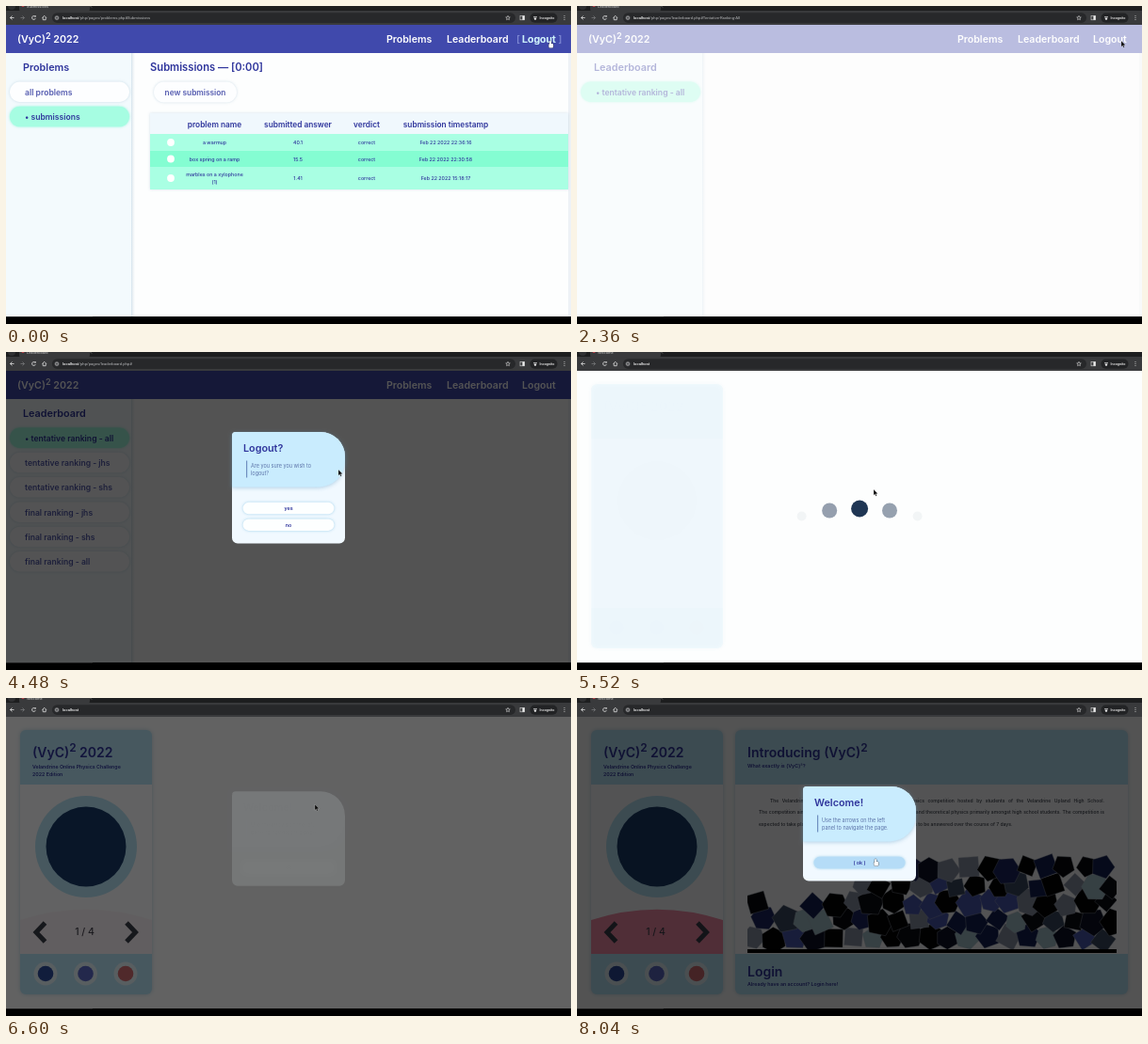
These frames come from a looping animation (600x338 px, 8080 ms). An HTML page with a canvas:

```html
<!DOCTYPE html>
<html lang="en">
<head>
<meta charset="utf-8">
<title>Contest site walkthrough</title>
<style>
html, body { margin: 0; width: 100%; height: 100%; overflow: hidden; background: #000; }
canvas { display: block; width: 600px; height: 338px; }
</style>
</head>
<body>
<canvas id="stage"></canvas>
<script>
const W = 600, H = 338, LOOP = 8080;
const canvas = document.getElementById('stage');
const ctx = canvas.getContext('2d');
const dpr = window.devicePixelRatio || 1;
canvas.width = W * dpr;
canvas.height = H * dpr;

const INK = '#2f359c', SOFT = '#555cb0', SKY = '#b8e4f6', PAGE = '#fdfefe';
const UI = 'Roboto, "Open Sans", sans-serif';
const BRAND = '(VyC)';

// ---- helpers ----
const clamp = v => Math.max(0, Math.min(1, v));
const ramp = (t, a, b) => clamp((t - a) / (b - a));
const ease = p => p * p * (3 - 2 * p);
const out = p => 1 - (1 - p) ** 3;

function seeded(seed) {
  return () => (seed = (seed * 16807) % 2147483647) / 2147483647;
}

function rect(x, y, w, h, color) {
  ctx.fillStyle = color;
  ctx.fillRect(x, y, w, h);
}

function round(x, y, w, h, r, color) {
  ctx.fillStyle = color;
  ctx.beginPath();
  ctx.roundRect(x, y, w, h, r);
  ctx.fill();
}

function dot(x, y, r, color) {
  ctx.fillStyle = color;
  ctx.beginPath();
  ctx.arc(x, y, r, 0, 7);
  ctx.fill();
}

function line(points, color, width) {
  ctx.strokeStyle = color;
  ctx.lineWidth = width;
  ctx.beginPath();
  points.forEach(([x, y]) => ctx.lineTo(x, y));
  ctx.stroke();
}

function text(s, x, y, size, color, weight = 600, align = 'left', family = 'Inter, sans-serif') {
  ctx.font = `${weight} ${size}px ${family}`;
  ctx.fillStyle = color;
  ctx.textAlign = align;
  ctx.textBaseline = 'alphabetic';
  ctx.fillText(s, x, y);
  return x + ctx.measureText(s).width;
}

function brand(lead, tail, x, y, size, color) {
  x = text(lead + BRAND, x, y, size, color);
  x = text('2', x, y - size * 0.36, size * 0.85, color);
  text(tail, x, y, size, color);
}

function justify(s, x, right, y, size, color) {
  const words = s.split(' ');
  ctx.font = `500 ${size}px Inter, sans-serif`;
  const widths = words.map(w => ctx.measureText(w).width);
  const gap = (right - x - widths.reduce((a, b) => a + b)) / (words.length - 1);
  words.forEach((w, i) => {
    text(w, x, y, size, color, 500);
    x += widths[i] + gap;
  });
}

function fade(alpha, draw) {
  if (alpha <= 0) return;
  ctx.save();
  ctx.globalAlpha *= alpha;
  draw();
  ctx.restore();
}

function glow(color, blur, dy = 0) {
  ctx.shadowColor = color;
  ctx.shadowBlur = blur * dpr;
  ctx.shadowOffsetY = dy * dpr;
}

function pill(x, y, w, h, color, shade = 'rgba(120,160,190,.35)') {
  ctx.save();
  glow(shade, 3);
  round(x, y, w, h, h / 2, color);
  ctx.restore();
}

// ---- browser frame ----
function chrome(title, host, path) {
  rect(0, 0, W, 5, '#1d1e1f');
  round(14, -6, 75, 12, 3, '#393a3c');
  dot(6, 0, 4, '#303133');
  dot(18, -0.5, 1.6, '#c2404a');
  text(title, 22, 1.6, 4, '#c8c8c8', 400, 'left', UI);
  line([[89.5, 0], [91, 1.5]], '#aaa', 0.5);
  rect(0, 5, W, 15, '#393a3c');
  round(49, 7.3, 492, 10.6, 5.3, '#27282a');

  const arrow = (x, d, c) => {
    line([[x - 2 * d, 12.5], [x + 2 * d, 12.5]], c, 0.8);
    line([[x, 10.5], [x + 2 * d, 12.5], [x, 14.5]], c, 0.8);
  };
  arrow(6.5, -1, '#e0e0e0');
  arrow(17.5, 1, '#77787a');
  ctx.strokeStyle = '#e0e0e0';
  ctx.lineWidth = 0.8;
  ctx.beginPath();
  ctx.arc(29.5, 12.5, 1.9, 0.3, 5.4);
  ctx.stroke();
  rect(30.4, 10.2, 1.4, 1.4, '#e0e0e0');
  line([[38.5, 12.5], [40.7, 10.3], [42.9, 12.5]], '#e0e0e0', 0.8);
  line([[39.2, 12], [39.2, 14.7], [42.2, 14.7], [42.2, 12]], '#e0e0e0', 0.8);
  dot(54, 12.6, 2.6, '#4c4d50');
  ctx.strokeStyle = '#ddd';
  ctx.lineWidth = 0.5;
  ctx.beginPath();
  ctx.arc(54, 12.6, 1.6, 0, 7);
  ctx.stroke();

  const x = text(host, 60, 14, 4.2, '#f2f2f2', 500, 'left', UI);
  text(path, x, 14, 4.2, '#b9babc', 400, 'left', UI);

  ctx.strokeStyle = '#d8d8d8';
  ctx.lineWidth = 0.6;
  ctx.beginPath();
  for (let i = 0; i < 10; i++) {
    const r = i % 2 ? 1.1 : 2.4, a = i * Math.PI / 5 - Math.PI / 2;
    ctx.lineTo(533 + r * Math.cos(a), 12.7 + r * Math.sin(a));
  }
  ctx.closePath();
  ctx.stroke();
  ctx.strokeRect(546, 10.4, 4.6, 4.4);
  rect(548.4, 10.4, 2.2, 4.4, '#eee');
  round(556.5, 7.5, 29, 10.2, 5, '#222325');
  dot(562, 13.6, 1.2, '#eee');
  rect(560, 11.4, 4, 0.8, '#eee');
  text('Incognito', 566.5, 14, 3.8, '#eee', 500, 'left', UI);
  [10.5, 12.5, 14.5].forEach(y => dot(593, y, 0.5, '#e0e0e0'));
}

function status(s) {
  round(0, 323.5, 69, 7.5, [0, 2, 0, 0], '#292a2c');
  text(s, 1.5, 328.6, 3.7, '#d6d6d6', 400, 'left', UI);
}

// ---- contest pages ----
function shell(heading, hover) {
  rect(0, 20, W, 311, PAGE);
  rect(0, 50, 134, 281, '#f3fafd');
  const edge = ctx.createLinearGradient(133, 0, 137, 0);
  edge.addColorStop(0, 'rgba(150,180,200,.3)');
  edge.addColorStop(1, 'rgba(150,180,200,0)');
  rect(133, 50, 4, 281, edge);
  rect(597, 50, 3, 281, '#eef2f6');

  rect(0, 20, W, 30, '#4049ac');
  brand('', ' 2022', 12, 39, 10.7, '#fff');
  text('Problems', 404, 39, 10.6, '#fff');
  text('Leaderboard', 468, 39, 10.6, '#fff');
  text('Logout', 548, 39, 10.6, '#fff');
  fade(hover, () => {
    text('Logout', 548, 39, 10.6, '#b5eafa');
    text('[', 544 - 2.5 * hover, 39, 10.6, '#8f9ade');
    text(']', 584.5 + 2.5 * hover, 39, 10.6, '#8f9ade');
  });
  text(heading, 18, 69, 10.8, INK);
}

function item(s, i, active) {
  const y = 80.5 + i * 26.3;
  if (active) pill(4, y, 127, 21.5, '#a6fde2', 'rgba(90,240,200,.6)');
  else pill(4, y, 127, 21.5, '#fdfeff');
  text((active ? '• ' : '') + s, 20, y + 14.1, 8.6, active ? INK : SOFT);
}

const rows = [
  [136, 18, ['a warmup'], '40.1', '22:36:16', '#a9ffe3'],
  [154, 17, ['box spring on a ramp'], '15.5', '22:30:58', '#84fdd2'],
  [171, 24, ['marbles on a xylophone', '(1)'], '1.41', '15:18:17', '#a9ffe3']
];

function submissions(hover) {
  shell('Problems', hover);
  item('all problems', 0, false);
  item('submissions', 1, true);
  text('Submissions — [0:00]', 153, 69, 11.2, INK);
  pill(157, 80.5, 88, 22, '#fdfeff');
  text('new submission', 201, 94.6, 8.3, SOFT, 600, 'center');

  ctx.save();
  glow('rgba(120,160,190,.3)', 3);
  rect(153, 114, 444, 81, '#f0f8fd');
  ctx.restore();
  const cols = [221.5, 310, 383, 467];
  ['problem name', 'submitted answer', 'verdict', 'submission timestamp']
    .forEach((s, i) => text(s, cols[i], 129, 8.3, INK, 600, 'center'));
  for (const [y, h, name, answer, time, color] of rows) {
    const mid = y + h / 2;
    const cell = (s, i, dy = 0) => text(s, cols[i], mid + 2.2 + dy, 5.3, INK, 500, 'center');
    rect(153, y, 444, h, color);
    dot(175, mid, 3.9, '#fff');
    name.forEach((s, i) => cell(s, 0, (i - (name.length - 1) / 2) * 7.6));
    cell(answer, 1);
    cell('correct', 2);
    cell('Feb 22 2022 ' + time, 3);
  }
}

function leaderboard(t, hover) {
  shell('Leaderboard', hover);
  ['tentative ranking - all', 'tentative ranking - jhs', 'tentative ranking - shs',
   'final ranking - jhs', 'final ranking - shs', 'final ranking - all']
    .forEach((s, i) => fade(i ? ramp(t, 2400 + i * 70, 2650 + i * 70) : 1, () => item(s, i, !i)));
}

function veil(a) {
  fade(a, () => rect(0, 20, W, 311, PAGE));
}

function shade(a) {
  rect(0, 20, W, 311, `rgba(0,0,0,${0.67 * a})`);
}

// Row of dots rolling over a shallow arch.
function loader(t) {
  const shift = (((t - 5520) / 320) % 1 + 1) % 1;
  for (let i = -3; i < 3; i++) {
    const k = i + shift, q = k * k;
    if (q < 6) fade(0.5 ** (q * 1.1), () =>
      dot(300 + 32.3 * k * (1 - 0.012 * q), 166.5 + 2 * q, Math.max(2, 9 - q), '#1f3654'));
  }
}

// ---- dialog ----
function dialog(a, y, h, title, lines, buttons, hover) {
  fade(a, () => {
    y += 6 * (1 - a);
    round(240, y, 120, h, [4, 26, 6, 6], '#f1f9ff');
    // Inner parts lag behind the panel.
    fade(ramp(a, 0.1, 0.8), () => {
      ctx.save();
      glow('rgba(100,160,200,.45)', 4, 1);
      round(240, y, 120, 58.5, [4, 26, 28, 0], '#c9ecfe');
      ctx.restore();
      text(title, 252, y + 21.3, 10.8, INK);
      rect(255, y + 30.5, 1.2, 18, '#6f8fc0');
      lines.forEach((s, i) => text(s, 260, y + 38 + i * 7.5, 5.5, '#5b73a8', 400));
      buttons.forEach((s, i) => {
        const top = y + 74.8 + i * 17.6;
        pill(251.5, top, 97, 12.5, hover === i ? '#b5dcf7' : '#fdffff', 'rgba(120,190,225,.7)');
        text(hover === i ? `( ${s} )` : s, 300, top + 8.2, 5.4, INK, 600, 'center');
      });
    });
  });
}

// ---- home page ----
function card(x, w) {
  ctx.save();
  glow('rgba(120,170,200,.45)', 4);
  round(x, 34, w, 281, 6, SKY);
  ctx.restore();
  rect(x, 92, w, 180, '#fdfeff');
}

function intro(t) {
  brand('', ' 2022', 28, 62.5, 14, INK);
  text('Velandrine Online Physics Challenge', 28, 75, 5.3, INK);
  text('2022 Edition', 28, 82.8, 5.3, INK);
  dot(85, 158, 54, SKY);
  dot(85, 158, 42.5, '#173a68');

  fade(ramp(t, 6560, 7000), () => {
    ctx.fillStyle = '#f58ca8';
    ctx.beginPath();
    ctx.moveTo(15, 272);
    ctx.lineTo(15, 236);
    ctx.quadraticCurveTo(85, 213.5, 155, 236);
    ctx.lineTo(155, 272);
    ctx.fill();
  });
  fade(ramp(t, 5900, 6500), () => {
    for (const [x, d] of [[37, -1], [132.5, 1]])
      line([[x - 4.5 * d, 239], [x + 5 * d, 249], [x - 4.5 * d, 259]], '#3a3d48', 5);
    text('1 / 4', 83.5, 251.8, 10.5, '#44434f', 500, 'center');
  });
  [[42, '#2c4a9c'], [84.5, '#5a68c4'], [127, '#cf6a70']].forEach(([x, c]) => {
    dot(x, 293, 12.5, '#e3f2f8');
    dot(x, 293, 8.3, c);
  });
}

function makeShapes() {
  const rnd = seeded(4177);
  const colors = ['#020203', '#06070c', '#0b1024', '#1c2660', '#4a58b0', '#8a92a6', '#020203', '#3b4a60', '#a5c4cc', '#0a0b12', '#131f52'];
  const list = [];
  for (let row = 0; row < 6; row++)
    for (let col = 0; col < 19; col++) {
      const shape = {
        x: 191 + col * 20.6 + (row % 2 ? 9 : 0) + rnd() * 6 - 4,
        y: 255 - row * 18.5 + rnd() * 6 - 3,
        r: 11.5 + rnd() * 4,
        sides: 4 + Math.floor(rnd() * 3),
        angle: rnd() * 6.28, spin: rnd() * 2 - 1,
        color: colors[Math.floor(rnd() * colors.length)],
        land: 7080 + row * 160 + rnd() * 180
      };
      const top = 212 - 48 * ramp(shape.x, 225, 380) + rnd() * 14;
      if (shape.y > top) list.push(shape);
    }
  return list;
}
const shapes = makeShapes();

function polygons(t) {
  ctx.save();
  ctx.beginPath();
  ctx.rect(181, 151, 392, 120);
  ctx.clip();
  for (const s of shapes) {
    const p = ramp(t, s.land - 420, s.land);
    const y = s.y - 160 * (1 - p * p);
    const a = s.angle + s.spin * (1 - p) + s.spin * 0.06 * Math.sin((t - s.land) / 90) * p;
    ctx.beginPath();
    for (let i = 0; i < s.sides; i++) {
      const q = a + i * 2 * Math.PI / s.sides;
      ctx.lineTo(s.x + s.r * Math.cos(q), y + s.r * Math.sin(q));
    }
    ctx.closePath();
    ctx.fillStyle = s.color;
    ctx.fill();
    ctx.strokeStyle = '#aab2c0';
    ctx.lineWidth = 0.4;
    ctx.stroke();
  }
  ctx.restore();
  rect(181, 267, 392, 4, '#000');
}

function about(t) {
  card(168, 417);
  brand('Introducing ', '', 181, 62.5, 14, INK);
  text('What exactly is ' + BRAND + '²?', 181, 73.8, 5.4, INK);
  const body = '#3b3f4c';
  justify('The Velandrine Online Physics Challenge is an online physics competition hosted by students of the Velandrine Upland High School.', 205, 560, 111, 5, body);
  justify('The competition aims to promote interest in the field of experimental and theoretical physics primarily amongst high school students. The competition is', 193, 560, 123.4, 5, body);
  text('expected to take place online, with a range of short and long problems to be answered over the course of 7 days.', 193, 135.8, 5, body, 500);
  polygons(t);
  text('Login', 181, 295.5, 14, INK);
  text('Already have an account? Login here!', 181, 306, 5.3, INK);
}

// ---- pointer ----
const track = [[0, 578, 37], [3900, 578, 37], [4480, 353, 125], [4680, 304, 164], [4960, 304, 164],
               [5520, 315, 146], [6600, 328, 113], [7000, 326, 122], [7440, 317, 171], [LOOP, 317, 171]];

function pointer(t) {
  const i = track.findIndex(k => k[0] > t);
  const [t0, x0, y0] = track[i - 1], [t1, x1, y1] = track[i];
  const p = ease(ramp(t, t0, t1));
  ctx.save();
  ctx.translate(x0 + (x1 - x0) * p, y0 + (y1 - y0) * p);
  ctx.lineWidth = 0.6;
  ctx.beginPath();
  const hand = t < 640 || (t > 3060 && t < 3920) || (t > 4640 && t < 4900) || t > 7400;
  if (hand) {
    ctx.roundRect(-0.8, 0, 1.7, 5, 0.8);
    ctx.roundRect(-1.6, 3, 4.8, 4.4, 1.2);
    ctx.fillStyle = '#fff';
    ctx.strokeStyle = '#111';
    ctx.stroke();
    ctx.fill();
  } else {
    [[0, 0], [0, 6.3], [1.4, 5], [2.4, 7.2], [3.4, 6.7], [2.4, 4.7], [4.3, 4.6]].forEach(([x, y]) => ctx.lineTo(x, y));
    ctx.closePath();
    ctx.fillStyle = '#0a0a0a';
    ctx.fill();
    ctx.strokeStyle = 'rgba(255,255,255,.7)';
    ctx.lineWidth = 0.3;
    ctx.stroke();
  }
  ctx.restore();
}

// ---- scenes ----
function scene(t) {
  if (t < 1000) {
    submissions(0.75 + 0.25 * ramp(t, 0, 200));
    fade(ramp(t, 40, 200) * (1 - ramp(t, 640, 800)), () => status('localhost/php/pages/problems.php#'));
    veil(ease(ramp(t, 560, 960)));
  } else if (t < 4820) {
    leaderboard(t, ease(ramp(t, 3080, 3280)) * (1 - ramp(t, 3880, 4020)));
    fade(ramp(t, 3120, 3280) * (1 - ramp(t, 3920, 4080)), () => status('localhost/php/pages/leaderboard.php#'));
    veil(1 - ease(ramp(t, 2200, 2600)));
    shade(out(ramp(t, 3736, 4096)));
    dialog(out(ramp(t, 3920, 4260)), 85, 118.5, 'Logout?', ['Are you sure you wish to', 'logout?'],
      ['yes', 'no'], t > 4640 ? 0 : -1);
    veil(ramp(t, 4760, 4820) * 0.3);
  } else {
    rect(0, 20, W, 311, PAGE);
    fade(0.15 * ramp(t, 5400, 5520) + 0.85 * ease(ramp(t, 5520, 6000)), () => card(15, 140));
    fade(ease(ramp(t, 5500, 6000)), () => intro(t));
    fade(ease(ramp(t, 6640, 7100)), () => about(t));
    shade(out(ramp(t, 6400, 6760)));
    dialog(out(ramp(t, 6585, 6925)), 94, 100.5, 'Welcome!', ['Use the arrows on the left', 'panel to navigate the page.'],
      ['ok'], t > 7400 ? 0 : -1);
  }
  fade(ramp(t, 960, 1120) * (1 - ramp(t, 2060, 2240)), () => loader(t));
  fade(ramp(t, 4860, 5020) * (1 - ramp(t, 5600, 5840)), () => loader(t));
}

function address(t) {
  if (t < 960) return ['Submissions', '/php/pages/problems.php#Submissions'];
  if (t < 2240) return ['Leaderboard', '/php/pages/leaderboard.php'];
  if (t < 3680) return ['Leaderboard', '/php/pages/leaderboard.php#Tentative-Ranking-All'];
  if (t < 4820) return ['Leaderboard', '/php/pages/leaderboard.php#'];
  return ['Welcome', ''];
}

function draw(t) {
  ctx.setTransform(dpr, 0, 0, dpr, 0, 0);
  rect(0, 0, W, H, '#000');
  scene(t);
  const [title, path] = address(t);
  chrome(title, 'localhost', path);
  rect(0, 330, W, 8, '#000');
  rect(0, 330, 92, 1, '#1c1c1c');
  pointer(t);
}

const start = performance.now();
function tick() {
  draw((performance.now() - start) % LOOP);
  requestAnimationFrame(tick);
}
tick();
</script>
</body>
</html>
```
